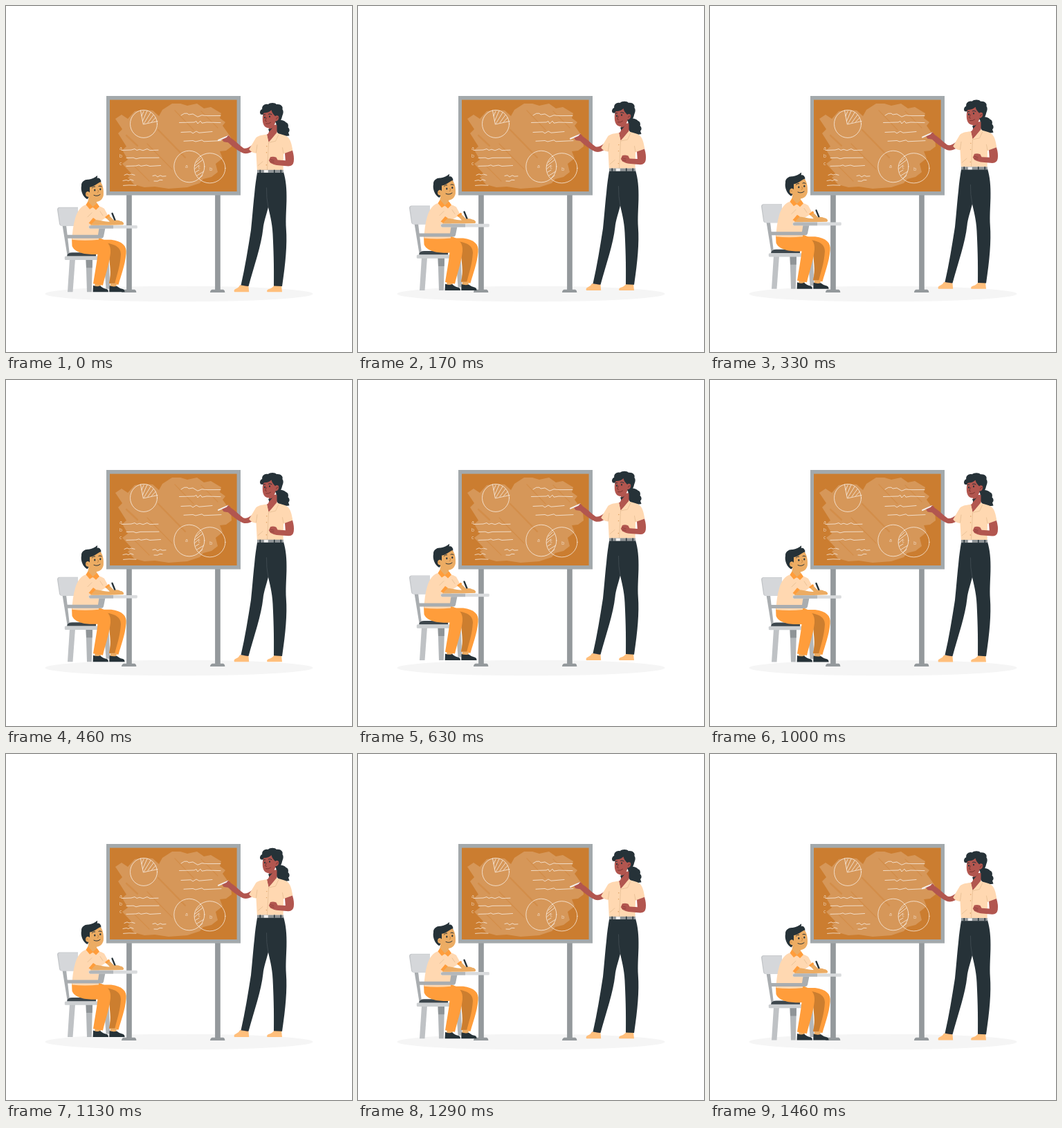
An HTML page that plays this animation: 500 by 500 pixels, repeating every 1.5 s.

```html
<!DOCTYPE html>
<html lang="en">
<head>
<meta charset="utf-8">
<title>Classroom</title>
<style>
html, body { margin: 0; width: 100%; height: 100%; overflow: hidden; background: #fff; }
svg { display: block; width: 100vw; height: 100vh; }
.dark { fill: #263238; }
.orange { fill: #ff9d3b; }
.deep { fill: #cc7e2f; }
.shirt { fill: #ffd8b1; }
.skinA { fill: #b2564f; }
.skinB { fill: #ecac63; }
.line { fill: none; stroke-linecap: round; stroke-linejoin: round; }
.chalk { stroke: #fff; stroke-opacity: .7; stroke-width: .95; }
.chalk text { fill: #fff; fill-opacity: .65; stroke: none; font: 7px "Open Sans", sans-serif; }
</style>
</head>
<body>
<svg viewBox="0 0 500 500">
  <ellipse cx="250" cy="416" rx="193.5" ry="11.3" fill="#f5f5f5"/>

  <g fill="#94999c">
    <path id="post" d="M174.1 272H181.8V409.7H186Q188.4 410.6 188.4 414H167Q167 410.6 170 409.7H174.1Z"/>
    <use href="#post" x="128"/>
  </g>
  <rect x="145" y="130" width="194" height="143.5" fill="#a3a9ac"/>
  <rect x="150" y="135.6" width="183.6" height="132.4" fill="#cb7d30"/>

  <path fill="#fff" fill-opacity=".2" d="M158 163L167 157L176 163L186 152L199 150L212 151L221 159L226 150L240 141L252 141L262 144L276 141L286 148L296 146L311 155L309 162L317 168L313 173L325 190L326 203L318 209L309 210L313 220L303 228L306 240L297 247L285 250L280 256L262 262L235 264L215 261L200 262L185 258L176 248L182 243L168 228L176 222L168 208L174 203L162 184L168 178Z"/>
  <g class="line" stroke="#cb7d30" stroke-opacity=".35">
    <path stroke-width="2.4" d="M220 179L259 219M174 187L190 202"/>
    <path stroke-width="1.2" d="M204 199L240 236M186 232L207 253M244 151L271 179M282 152L306 176"/>
  </g>

  <g class="line chalk">
    <ellipse cx="199" cy="170.4" rx="19.5" ry="20"/>
    <path d="M194.5 151L198.3 171L219 166.5M199 152L196 159M204 151.5L197.5 166M209 154L199.5 169.5M213 157.5L205 168.5M216 161.5L210.5 167.5"/>
    <path d="M253 158Q258 153.8 262 155.2L264 157L270 156L277 160.2L283 157.8L290 158.6L310 158.5"/>
    <path d="M250.5 168.5L272 168L275 166.5L277 170L281 166.2L283 169.2L290 168L310 168.6"/>
    <path d="M253 182.5L267 181.8L270 184L275 181L279 183.2L298 181.5"/>
    <path d="M257 195.3L270 194.5L274 196L283 193.8L286 195.8L311 194.6"/>
    <path d="M167 208.5L181 208L186 206.5L189 208.5L193 207.2L198 208.8L204 206.5L208 208.6L220 208.2"/>
    <path d="M174 219.6L184 219.2L188 220.8L194 219.4L221 219.2"/>
    <path d="M174 231.4L188 231L192 229.8L195 231.4L203 230L208 231.5L223.5 230.5"/>
    <path d="M171 244.5L175 242.8L178 244.2L181 243L186 244.4M169 252.5L174 251.5L177 252.6L180 250.8L184 252.2M169.5 259.4L178 258.8L188 259.2"/>
    <path d="M212 245.5L216 244.6L219 247L223 244.8L226 246.2L231 245.8M214 253L219 253.2L222 251.4L226 251.6"/>
    <ellipse cx="264.8" cy="232" rx="22" ry="22.8"/>
    <ellipse cx="294.5" cy="234.3" rx="22.4" ry="21.6"/>
    <path d="M275 226L281 220M273 231L284 222.5M272.6 235.5L279 230M274 240L279 237M276 245L285 239.5M279 249L284 245"/>
    <text x="164" y="208">a</text><text x="163.8" y="219">b</text><text x="164" y="230">c</text>
    <text x="259" y="234">a</text><text x="277.5" y="235">c</text><text x="294" y="237.5">b</text>
  </g>

  <g id="people">
    <!-- chair -->
    <path fill="#a9adb0" d="M81.5 317H87L92 360H88.5Z"/>
    <path fill="#bfc2c5" d="M92 366H100L96.5 413.5H89Z"/>
    <path fill="#b3b7ba" d="M115.5 366H125L123.8 413.5H117Z"/>
    <path fill="#8f9497" d="M115.5 366H125L124.7 378.5H116Z"/>
    <path fill="#b3b7ba" d="M141.5 366H148.5L150.5 409H144.5Z"/>
    <path fill="#c3c6c9" d="M74 294.5Q74 291 77.5 291H104V318H80.5Q77.5 318 77 315Z"/>
    <path fill="#d5d7da" d="M75.5 294.5Q75.5 291.6 78.5 291.6H104V318H81.5Q78.6 318 78.2 315Z"/>
    <path fill="#3d474d" d="M88 362Q88.5 356.5 96 356.5H130V362Z"/>
    <rect x="84.8" y="361.8" width="68" height="5.4" rx="1.5" fill="#cccfd1"/>

    <!-- student -->
    <path class="orange" d="M130 338H152C168 340 175 347 173.6 358C172 375 166 390 162.5 403L149 401C152 388 152 373 151 360Z"/>
    <path class="deep" d="M138 342C152 343 166 346 166 359C165 376 160 390 157 402L149 401C153 386 149 372 149 358Z"/>
    <path class="skinB" d="M151 401H160L159 408H150ZM128.5 400H137.5L136 408H128Z"/>
    <path class="orange" d="M95 335H134C147 339 152 346 151 357C149 375 143 390 140 404L126 401.5C128 388 131 373 132.5 359C116 360 99 357 95.5 347Z"/>
    <path class="dark" d="M126 404Q131 406.5 136 404.5Q140 408.5 146 409.5Q148 410.5 148 413.5H125.6Z"/>
    <path class="dark" d="M149.6 404.5Q155 406.5 160 405Q164 408.5 169.5 409.5Q171.6 410.5 171.6 413.5H149.2Z"/>

    <path class="shirt" d="M117 287C108 289 103 297 100 307C97 317 96 327 95.3 338Q114 340 134 338L135 312L148 304L142 293Q138 290 131 289Z"/>
    <path class="line" stroke="#e5bd92" stroke-width=".8" d="M118 305L124 299M136 297L140 303"/>
    <path class="skinB" d="M126 309C134 309 142 312 148 312L158 311Q167 310 170 314L169 316.4L150 317H122Z"/>
    <path class="skinB" d="M144 306L149 303L157 311L152 314Z"/>
    <path class="orange" d="M119.5 314L126 306.3L129.8 309L123 316ZM143 305.2L148.6 301L150.4 303.2L145 307.4Z"/>
    <path class="skinB" d="M119.5 276H131V286L126 292L118 285Z"/>
    <path class="orange" d="M118.5 282.5L125.5 290.5L131.5 285L135 290L130 295L125.5 291L121 294L115.5 287.5Z"/>

    <path class="dark" d="M117.5 279.5C111 276 107.5 267 109 260C108.5 254 114 250.5 119.5 251C124 250.5 129 248 132 245.2C132 247.5 132 248 131.5 249C134 248.5 135.5 248.6 137.3 252.6L137 262L123 272Z"/>
    <path class="skinB" d="M121 262C126 262 131 257 136.5 254.5C140.5 259 141.5 268 140.8 274C139.5 281 133 284.5 127 282.6C122 281 119.5 278 119 276C115.5 276.5 113.8 272 116 269.3C118 267.2 120 268.5 121 270Z"/>
    <ellipse class="dark" cx="128.3" cy="266.3" rx="1.1" ry="1.5"/>
    <ellipse class="dark" cx="136.3" cy="265" rx="1.1" ry="1.5"/>
    <path class="line" stroke="#263238" stroke-width="1" d="M124.5 263Q126 260.5 128.6 261.2M134 260.6Q136 259.4 138 261M127 273.6Q132 276 136 272.6"/>
    <path class="line" stroke="#b97a38" stroke-width=".8" d="M133 266Q134.5 269 132.5 270.2M116 272Q117.5 270.5 118.4 272.4"/>

    <path class="line" stroke="#263238" stroke-width="2.4" stroke-linecap="butt" d="M153.5 300L157.8 310.5"/>
    <path class="skinB" d="M155 310.5Q161 308.5 165 311Q170 311.5 170 316H154Z"/>
    <path fill="#a9adb0" d="M134.5 321H143.5L141 333.5Q140.4 336 137.5 336H87V331H133Z"/>
    <rect x="119.5" y="317.2" width="70.3" height="4.6" rx="1.4" fill="#d9dbdd"/>
    <path fill="#b3b7ba" d="M120 318.6Q122 317.2 126 317.2H155V321.8H121.5Q119.5 321 120 318.6Z"/>

    <!-- teacher -->
    <path class="dark" d="M391 168C393 163 402 165 404.6 168.4C408 169 408.5 174 407.5 175.5C410.5 178 410 182 408 183L409.5 187.5C404 188.8 396 188 393 184C389.5 181 391.5 177 390 174Z"/>
    <path class="skinA" d="M338 404H349.5V407H337Z"/>
    <path fill="#ffbf7c" d="M338.5 403.5L350.5 405.5L351.2 413.5H330Q328.5 410.5 332 409Q336 407.5 338.5 403.5ZM387.5 404H398L399 413.5H377.5Q376 410.5 380 409.2Q385 408 387.5 404Z"/>
    <path class="dark" d="M363.2 240H401C404.5 252 405.8 264 405.4 282C405 297 404 308 404.8 322C406.5 345 404 372 399 405.2L387 404.6C387.5 375 386.5 350 385.5 330C384.5 312 381 301 379 291C376 303 372.5 312 371.5 322C369 346 358.5 376 350.5 405.2L339.5 403.6C345.5 378 349.5 352 354 324C356 305 357 290 359 272C360 260 361.5 250 363.2 240Z"/>
    <path class="line" stroke="#455056" stroke-width=".8" d="M376.5 263Q376 277 379 291"/>

    <path class="skinA" d="M356 201C351 205 346 207 343 205.5C337 201 331 195 325 191L318.5 187.5L312 193L314.5 196.5L321 197.5C328 204 337 211 344 213.2C350 214 355 211.5 360 208Z"/>
    <path class="line" stroke="#f4efeb" stroke-width="2" d="M307 194.2L321 188"/>
    <path class="skinA" d="M321 187L324.5 190L321 193.5L318 191.5Z"/>

    <path class="shirt" d="M376 186C369 187 364 187.5 361 191L351.2 207.5Q355 212.5 361.5 213L362.8 237.2H400.6L401 214L414.3 209C413 200 411 193 407 189.5C403 186.5 397 185.5 391 184Z"/>
    <path class="skinA" d="M380 172H391.5V185.5L379.5 197L377 186Q380.5 184 380 180Z"/>
    <path fill="#263238" d="M379 178Q385 178 387 174L380.4 182Z"/>
    <path class="shirt" d="M376.8 185L379.5 197.5L375 193ZM391.5 183L379.5 197.5L389.5 195.5L394 186Z"/>
    <path class="line" stroke="#e5bd92" stroke-width=".8" d="M379.5 197.5L389.5 195.5L393.5 187M379.5 198L377.5 237M361.5 212L363 201M401 213L399.5 205M364 231L371 225"/>
    <g fill="#d99a58"><circle cx="376.8" cy="203" r=".7"/><circle cx="376.5" cy="212" r=".7"/><circle cx="376.3" cy="230" r=".7"/></g>
    <path class="skinA" d="M403 213L414 209Q416.8 218 415.8 225Q415 231.5 408 231.6L391 230.2Q387 229.8 382 227L379.8 223.5L382 218.5Q386 217 390.5 219L392.5 222.8L403.8 223.5Z"/>
    <path class="line" stroke="#853b36" stroke-width=".7" d="M382 222L387 223.5M382.5 225L387 226"/>

    <rect x="363" y="237" width="37.8" height="4.2" fill="#8f9497"/>
    <path class="dark" d="M366.5 237h1.5v4.2h-1.5zM387 237h1.5v4.2h-1.5zM396.5 237h1.5v4.2h-1.5z"/>
    <rect x="372.8" y="237.2" width="6" height="3.8" fill="#f1f1f1"/>

    <path class="dark" d="M368.2 157C365.6 154 367.8 150 370.2 149.3C369.4 144 374.6 141 378.6 142.4C381.5 139.4 389 139.6 391 142.4C396.5 141.5 401 145.5 399.4 149.5C402 153 400 157 399 160C398 165 395 169 391 171L383 158Z"/>
    <path class="skinA" d="M372.5 154.5C377 155 381 153 383.5 150.5C384.5 155 387 157 389 159.5C391 157.5 394.5 158 394.3 161.5C394 165.5 391.5 167 389.5 166.5C389 172 385 177 379.5 176.6C373.5 176.4 371 171 370.8 165C370.6 160 371.3 157 372.5 154.5Z"/>
    <path class="dark" d="M369 155Q372 156 375 153.5Q380 154 384 150L380 145L371 149Z"/>
    <ellipse class="dark" cx="374" cy="161.3" rx="1" ry="1.4"/>
    <ellipse class="dark" cx="381" cy="160" rx="1" ry="1.4"/>
    <path class="line" stroke="#263238" stroke-width="1" d="M371.8 158Q373 156.6 374.6 157.2M379.5 156.4Q381.5 155.2 384 157"/>
    <path class="line" stroke="#6d2c2a" stroke-width=".8" d="M376.5 161.5L374.5 166.2L376.5 166.8M375.5 170.3Q379.5 171.2 382.5 168.6M390.5 163.4Q391.2 161 393 161.2"/>
  </g>
</svg>
<script>
const people = document.getElementById('people');
const LOOP = 1500, STEPS = 36, LEAD = 30, RISE = 10, BASE = 0.2;

// Linear float up and down, stepped at 24 per second.
function draw(ms) {
  const step = Math.floor((ms + 4) * STEPS / LOOP) % STEPS;
  const phase = (step / STEPS + LEAD / LOOP) % 1;
  const lift = RISE * (1 - Math.abs(2 * phase - 1));
  people.setAttribute('transform', `translate(0 ${(BASE - lift).toFixed(3)})`);
}

const start = performance.now();
function tick(now) {
  draw(Math.max(0, now - start) % LOOP);
  requestAnimationFrame(tick);
}
draw(0);
requestAnimationFrame(tick);
</script>
</body>
</html>
```
